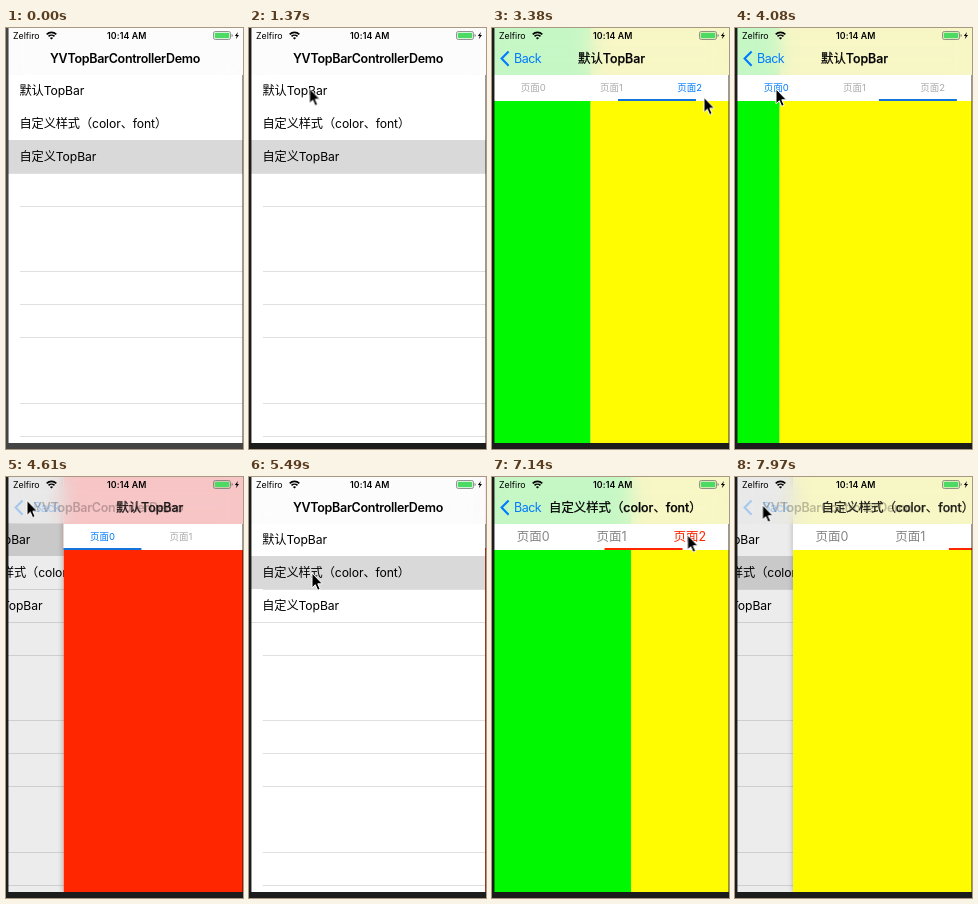
Recreate the animation shown at these times as an HTML page. Size 237x421 px, loop 8 s.

```html
<!DOCTYPE html>
<html lang="zh-CN">
<head>
<meta charset="utf-8">
<title>TopBar demo</title>
<style>
/* --push: 0 = list, 1 = pager on screen; --page: scroll position in pages */
@property --push { syntax: "<number>"; inherits: true; initial-value: 0; }
@property --page { syntax: "<number>"; inherits: true; initial-value: 0; }

:root {
  --w: 235px;
  --blue: #007aff;
  --red: #ff2600;
  --pale: #aaa;
  --gray: #858585;
}
* { box-sizing: border-box; }
html, body { margin: 0; width: 100%; height: 100%; overflow: hidden; }
body {
  font: 12.2px/1 Inter, "Noto Sans CJK SC", "Noto Sans CJK", sans-serif;
  color: #000;
}
.stage, .stage div, .stage svg, .stage span { position: absolute; }
.stage {
  left: 0; top: 0; width: 237px; height: 421px;
  overflow: hidden;
  white-space: nowrap;
  animation: push 8s linear infinite, page 8s linear infinite, frame 8s step-end infinite;
}
.screen { left: 2px; top: 0; width: var(--w); height: 415px; overflow: hidden; background: #fff; }
.edge { width: 1px; background: rgb(0 0 0 / .4); }

/* list */
.list {
  inset: 0;
  background: linear-gradient(#fcfcfc 47px, #fff 0);
  transform: translateX(calc(var(--push) * -70.5px));
}
.row {
  left: 0; top: var(--y); width: 100%; height: 33px;
  padding-left: 11.5px;
  line-height: 33px;
  letter-spacing: -.1px;
}
.line { left: 12px; right: 0; top: var(--y); height: 1px; background: #e0e0e2; }
.dim { inset: 0; background: #000; opacity: calc(var(--push) * .1); }
.r1 { animation: row1 8s step-end infinite; }
.r2 { animation: row2 8s step-end infinite; }
.r3 { animation: row3 8s step-end infinite; }

/* pager */
.pager {
  inset: 0;
  transform: translateX(calc((1 - var(--push)) * var(--w)));
  box-shadow: -1px 0 5px rgb(0 0 0 / calc(var(--push) * .3));
}
.clip { inset: 0; overflow: hidden; }
.strip { left: 0; top: 0; width: 705px; height: 100%; transform: translateX(calc(var(--page) * var(--w) * -1)); }
.sheet { top: 0; width: var(--w); height: 100%; background: linear-gradient(var(--tint) 47px, var(--fill) 0); }
.tabs {
  left: 0; top: 47px; width: 100%; height: 26px;
  background: #fff;
  animation: size 8s step-end infinite;
}
.tab { top: 0; width: 78.3px; line-height: 25px; text-align: center; }
.t0 { left: 0; animation: tab0 8s step-end infinite; }
.t1 { left: 78.3px; animation: tab1 8s step-end infinite; }
.t2 { left: 156.6px; animation: tab2 8s step-end infinite; }
.mark {
  left: 0; top: 24px; width: 78px; height: 2px;
  transform: translateX(calc(var(--page) * 78px));
  animation: mark 8s step-end infinite;
}

/* bars */
.nav { left: 0; top: 0; width: 100%; height: 47px; overflow: hidden; backdrop-filter: blur(10px); }
.nav span { top: 21px; line-height: 20px; }
.home {
  left: 20px;
  font-size: 12.5px;
  font-weight: 600;
  letter-spacing: -.3px;
  opacity: calc(1 - var(--push));
  transform: translateX(calc((1 - var(--push)) * 22px));
}
.shown {
  font-size: 12.4px;
  font-weight: 500;
  -webkit-text-stroke: .25px;
  opacity: calc(var(--push) * 1.15);
  transform: translateX(calc((1 - var(--push)) * var(--slide)));
}
.plain { left: 84px; --slide: 103px; animation: plain 8s step-end infinite; }
.custom { left: 55px; --slide: 124px; animation: custom 8s step-end infinite; }
.back { opacity: calc(1 - (1 - var(--push)) * 3); color: var(--blue); }
.nav .label {
  left: 20px;
  font-size: 12.5px;
  letter-spacing: -.5px;
  transform: translateX(calc((1 - var(--push)) * 22px));
}
.nav .status { top: 2px; font-size: 8.8px; line-height: 11px; }
.nav .time { left: 99px; font-weight: 600; letter-spacing: .1px; }
.cursor { left: .5px; top: 0; overflow: visible; animation: cursor 8s ease-in-out infinite; }

@keyframes frame { 0% { background: #444; } 3.75% { background: #1c1c1c; } }

@keyframes push {
  0% { --push: 0; }
  20%, 68.625% { --push: 0; animation-timing-function: cubic-bezier(.38, .7, .125, 1); }
  26.25%, 74.875% { --push: 1; }
  56.94% { --push: 1; animation-timing-function: cubic-bezier(.38, .7, .125, 1); }
  63.125% { --push: 0; }
  98.875% { --push: 1; }
  99.625% { --push: .766; }
  100% { --push: .65; }
}
@keyframes page {
  0% { --page: 0; }
  34.375% { --page: 0; animation-timing-function: ease-in-out; }
  37.875% { --page: 1; }
  40.875% { --page: 1; animation-timing-function: cubic-bezier(.35, .2, .6, 1); }
  43.7% { --page: 2; }
  50.25% { --page: 2; animation-timing-function: ease-in-out; }
  53.875% { --page: 0; }
  79.625% { --page: 0; animation-timing-function: ease-in-out; }
  83.25% { --page: 1; }
  87.75% { --page: 1; animation-timing-function: ease-in-out; }
  91.1%, 100% { --page: 2; }
}

@keyframes row1 { 0% { background: #fff0; } 20% { background: #d9d9d9; } 68.625% { background: #fff0; } }
@keyframes row2 { 0% { background: #fff0; } 68.625% { background: #d9d9d9; } }
@keyframes row3 { 0% { background: #d9d9d9; } 20% { background: #fff0; } }

@keyframes size { 0% { font-size: 9.5px; } 68.625% { font-size: 12.5px; } }
@keyframes mark { 0% { background: #1573dc; } 68.625% { background: var(--red); } }
@keyframes tab0 {
  0%, 50.25% { color: var(--blue); }
  34.375% { color: var(--pale); }
  68.625% { color: var(--red); }
  79.625% { color: var(--gray); }
}
@keyframes tab1 {
  0%, 40.875% { color: var(--pale); }
  34.375% { color: var(--blue); }
  68.625%, 87.75% { color: var(--gray); }
  79.625% { color: var(--red); }
}
@keyframes tab2 {
  0%, 50.25% { color: var(--pale); }
  40.875% { color: var(--blue); }
  68.625% { color: var(--gray); }
  87.75% { color: var(--red); }
}
@keyframes plain { 0% { visibility: visible; } 68.625% { visibility: hidden; } }
@keyframes custom { 0% { visibility: hidden; } 68.625% { visibility: visible; } }

@keyframes cursor {
  0%, 12% { transform: translate(98px, -20px); }
  17.125%, 28% { transform: translate(59.5px, 60.5px); }
  30%, 30.75% { transform: translate(102.5px, 57.5px); }
  31.5%, 36% { transform: translate(115px, 57.5px); }
  37.875%, 44% { transform: translate(211px, 69.5px); }
  47.25%, 52% { transform: translate(40px, 61px); }
  53.875%, 61% { transform: translate(20px, 23.5px); }
  64.875%, 72.5% { transform: translate(62px, 96px); }
  75.875%, 81.5% { transform: translate(140.5px, 61.5px); }
  84.75%, 91.25% { transform: translate(194.5px, 58px); }
  95.875%, 100% { transform: translate(26.5px, 28px); }
}
</style>
</head>
<body>
<div class="stage">
  <div class="screen">
    <div class="list">
      <div class="line" style="--y:112px"></div>
      <div class="line" style="--y:145px; left:0"></div>
      <div class="line" style="--y:178px"></div>
      <div class="line" style="--y:243px"></div>
      <div class="line" style="--y:276px"></div>
      <div class="line" style="--y:309px"></div>
      <div class="line" style="--y:375px"></div>
      <div class="line" style="--y:408px"></div>
      <div class="row r1" style="--y:46px">默认TopBar</div>
      <div class="row r2" style="--y:79px">自定义样式（color、font）</div>
      <div class="row r3" style="--y:112px">自定义TopBar</div>
      <div class="dim"></div>
    </div>

    <div class="pager">
      <div class="clip">
        <div class="strip">
          <div class="sheet" style="left:0; --tint:#f7c5c5; --fill:#ff2600"></div>
          <div class="sheet" style="left:235px; --tint:#c5f7c5; --fill:#00f900"></div>
          <div class="sheet" style="left:470px; --tint:#f7f6c5; --fill:#fffb00"></div>
        </div>
      </div>
      <div class="tabs">
        <div class="tab t0">页面0</div>
        <div class="tab t1">页面1</div>
        <div class="tab t2">页面2</div>
        <div class="mark"></div>
      </div>
    </div>

    <div class="nav">
      <span class="home">YVTopBarControllerDemo</span>
      <span class="shown plain">默认TopBar</span>
      <span class="shown custom">自定义样式（color、font）</span>
      <div class="back">
        <svg width="20" height="47" fill="none" stroke="currentColor" stroke-width="2.1"><path d="M14.6 23.4L7.6 30.6l7 7.2"/></svg>
        <span class="label">Back</span>
      </div>
      <span class="status" style="left:5px">Zelfiro</span>
      <svg style="left:38px; top:3px" width="11" height="9" fill="none" stroke="#000" stroke-width="1.6">
        <path d="M.7 3.4a6.8 6.8 0 0 1 9.6 0M2.5 5.4a4.3 4.3 0 0 1 6 0"/>
        <path d="M5.5 8.6L3.9 7a2.3 2.3 0 0 1 3.2 0z" fill="#000" stroke="none"/>
      </svg>
      <span class="status time">10:14 AM</span>
      <svg style="left:205px; top:3px" width="28" height="9">
        <rect x=".5" y=".5" width="17" height="8" rx="1.8" fill="none" stroke="#777" stroke-width=".8"/>
        <rect x="1.7" y="1.7" width="14.6" height="5.6" rx=".8" fill="#4cd964"/>
        <path d="M18.6 3v3q1.1-.4 1.1-1.5T18.6 3z" fill="#777"/>
        <path d="M25 1l-3.2 4h1.9l-.9 3.2L26 4.1h-1.9z"/>
      </svg>
    </div>
  </div>
  <div class="edge" style="left:2px; top:0; height:415px"></div>
  <div class="edge" style="right:0; top:47px; height:368px"></div>
  <svg class="cursor" width="12" height="19">
    <path d="M0 0V14.8L3.3 11.7 5.7 17.3 8.2 16.2 5.8 10.8H10.4Z" stroke="#fff" stroke-width="1"/>
  </svg>
</div>
</body>
</html>
```
